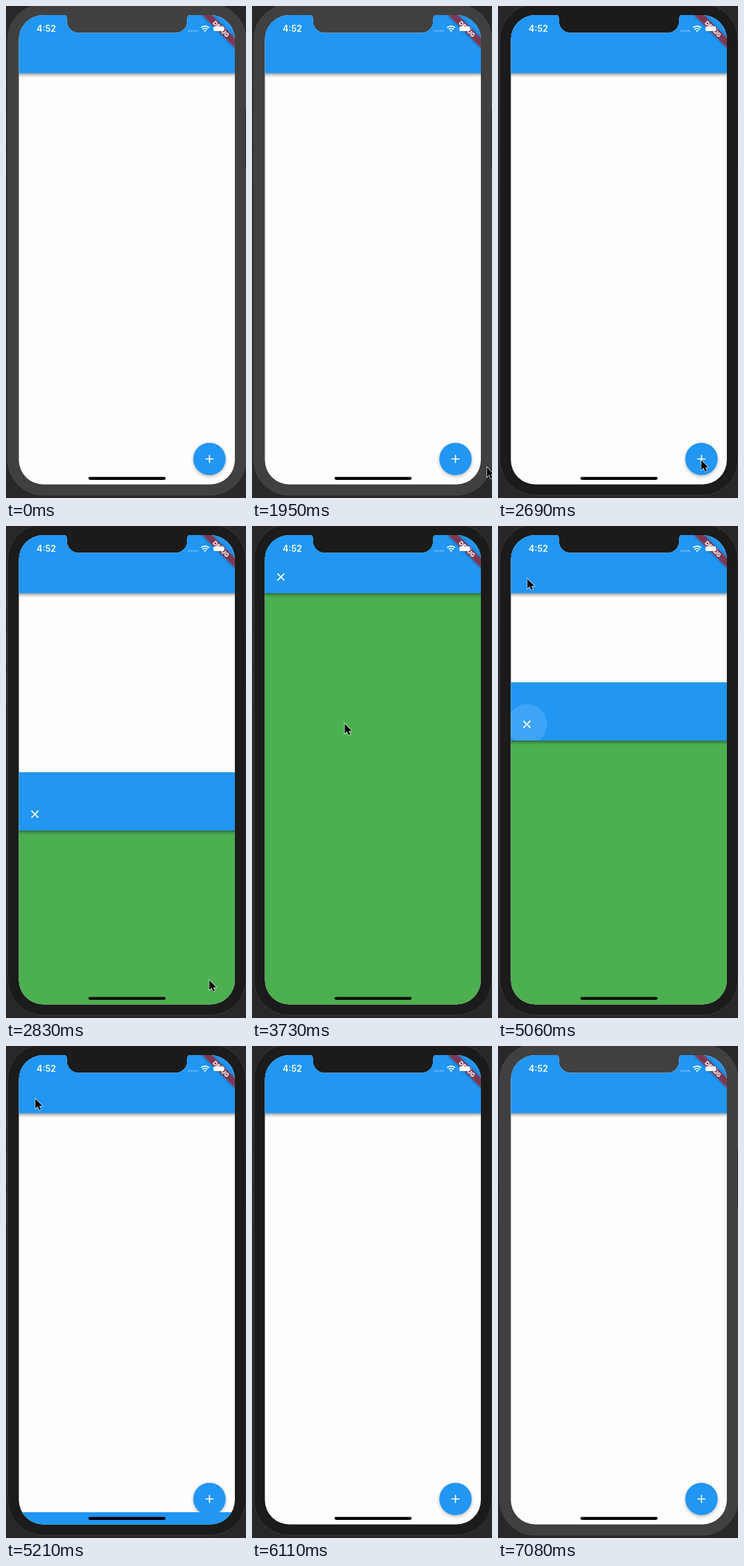
An HTML page that plays this animation: 345 by 706 pixels, repeating every 7110 ms.

```html
<!DOCTYPE html>
<html lang="en">
<head>
<meta charset="utf-8">
<title>Full-screen page transition</title>
<style>
html, body { margin: 0; width: 100%; height: 100%; overflow: hidden; background: #282828; }
svg { display: block; width: 345px; height: 706px; }
text { font-family: Inter, Roboto, sans-serif; fill: #fff; }
#bezel { fill: #404040; stroke: #464646; }
.active #bezel { fill: #1b1b1b; stroke: #393939; }
#fab { filter: drop-shadow(0 2.5px 2.5px rgba(0,0,0,.28)); }
#banner { filter: drop-shadow(0 0 2.5px rgba(0,0,0,.5)); }
.icon { fill: none; stroke: #fff; stroke-width: 1.7; }
</style>
</head>
<body>
<svg id="stage" viewBox="0 0 345 706">
  <defs>
    <clipPath id="screen">
      <path d="M18.5 48a35 35 0 0 1 35-35H83q4.5 0 4.5 5v3.5a17 17 0 0 0 17 17h139a17 17 0 0 0 17-17V18q0-5 4.500-5H294a35 35 0 0 1 35 35V651.500a35 35 0 0 1-35 35H53.500a35 35 0 0 1-35-35z"/>
    </clipPath>
    <clipPath id="barClip"><rect x="18" width="312" height="83"/></clipPath>
    <linearGradient id="shade" x2="0" y2="1">
      <stop stop-opacity=".38"/>
      <stop offset=".5" stop-opacity=".13"/>
      <stop offset="1" stop-opacity="0"/>
    </linearGradient>
    <g id="bar">
      <rect x="18" width="312" height="83.500" fill="#2196f3"/>
      <rect x="18" y="83.500" width="312" height="6.500" fill="url(#shade)"/>
    </g>
  </defs>

  <rect width="345" height="706" fill="#282828"/>
  <path d="M-1 95.500H3V124.500H-1zM-1 148.500H3V198.500H-1zM-1 205.500H3V255.500H-1z" fill="#2b2b2b" stroke="#141414"/>
  <rect id="bezel" x="2.500" y="-2.500" width="342.500" height="704.500" rx="51"/>
  <path d="M344.500 149V232" stroke="#222"/>

  <g clip-path="url(#screen)">
    <rect width="345" height="706" fill="#fefefe"/>
    <use href="#bar" y="13"/>
    <g id="fab">
      <circle cx="292.500" cy="650" r="23.300" fill="#2196f3"/>
      <path class="icon" d="M286.700 650h11.600m-5.800-5.800v11.600"/>
    </g>
    <g id="page">
      <rect width="345" height="706" fill="#4caf50"/>
      <use href="#bar"/>
      <circle id="ripple" cx="41.500" cy="60" r="29" fill="#fff" fill-opacity=".13" clip-path="url(#barClip)"/>
      <path class="icon" d="M36.500 55.200l10 10m0-10l-10 10"/>
    </g>
    <g transform="translate(329 13) rotate(45)">
      <rect id="banner" x="-33" y="23.200" width="66" height="10" fill="#b71c1c" fill-opacity=".63"/>
      <text y="31.300" font-size="8.300" font-weight="800" text-anchor="middle">DEBUG</text>
    </g>
    <rect id="home" x="118.500" y="675.700" width="111" height="4.300" rx="2.150"/>
  </g>

  <text x="44" y="37" font-size="12.600" font-weight="600">4:52</text>
  <path d="M263.300 35.800h.01m3.700 0h.01m3.700 0h.01m3.700 0h.01" stroke="#fff" stroke-opacity=".4" stroke-width="2.600" stroke-linecap="round"/>
  <g fill="none" stroke="#fff" stroke-width="1.800">
    <path d="M280.500 31.200a8.200 8.200 0 0 1 11.400 0M282.700 33.600a5 5 0 0 1 7 0"/>
    <path d="M284.300 35.200q1.900-1.500 3.800 0l-1.900 2z" fill="#fff" stroke="none"/>
  </g>
  <rect x="298.300" y="29.300" width="15" height="6.700" rx="1.500" fill="#fff"/>
  <path d="M315 31.200v3" stroke="#fff" stroke-opacity=".5"/>

  <path id="cursor" d="M.8.800V14.800L4 11.800L6.200 17L8.700 16L6.500 11H10.800z" stroke="#fff" stroke-width="1.200" paint-order="stroke"/>
</svg>
<script>
const LOOP = 7110, TOP = 13, HIDDEN = 720;

// [start ms, value], each held until the next entry
const pageTop = [[0, HIDDEN], [2830, 353.5], [2980, TOP], [5060, 224.5], [5210, 669], [5360, HIDDEN]];
const pointer = [
  [0, null], [1950, [337, 661]], [2100, [302, 652]], [2250, [291.5, 651]],
  [3730, [132.5, 283]], [3880, [126, 247]], [4030, [97, 185]], [4170, [45, 82]],
  [4320, [42, 76]], [4620, [41.5, 75]], [6110, null], [6550, [333, 699]], [6700, null]
];

const $ = id => document.getElementById(id);
const valueAt = (steps, t) => steps.findLast(([start]) => start <= t)[1];
const show = (el, on) => el.setAttribute('visibility', on ? 'visible' : 'hidden');

function draw(now) {
  const t = now % LOOP;
  const y = valueAt(pageTop, t), at = valueAt(pointer, t);
  $('stage').classList.toggle('active', t >= 2690 && t < 7080);
  $('page').setAttribute('transform', `translate(0 ${y})`);
  show($('page'), y < HIDDEN);
  show($('ripple'), t >= 5060 && t < 5360);
  $('home').setAttribute('fill', y < 600 ? '#111' : '#000');
  show($('cursor'), at);
  if (at) $('cursor').setAttribute('transform', `translate(${at})`);
  requestAnimationFrame(draw);
}
draw(performance.now());
</script>
</body>
</html>
```
